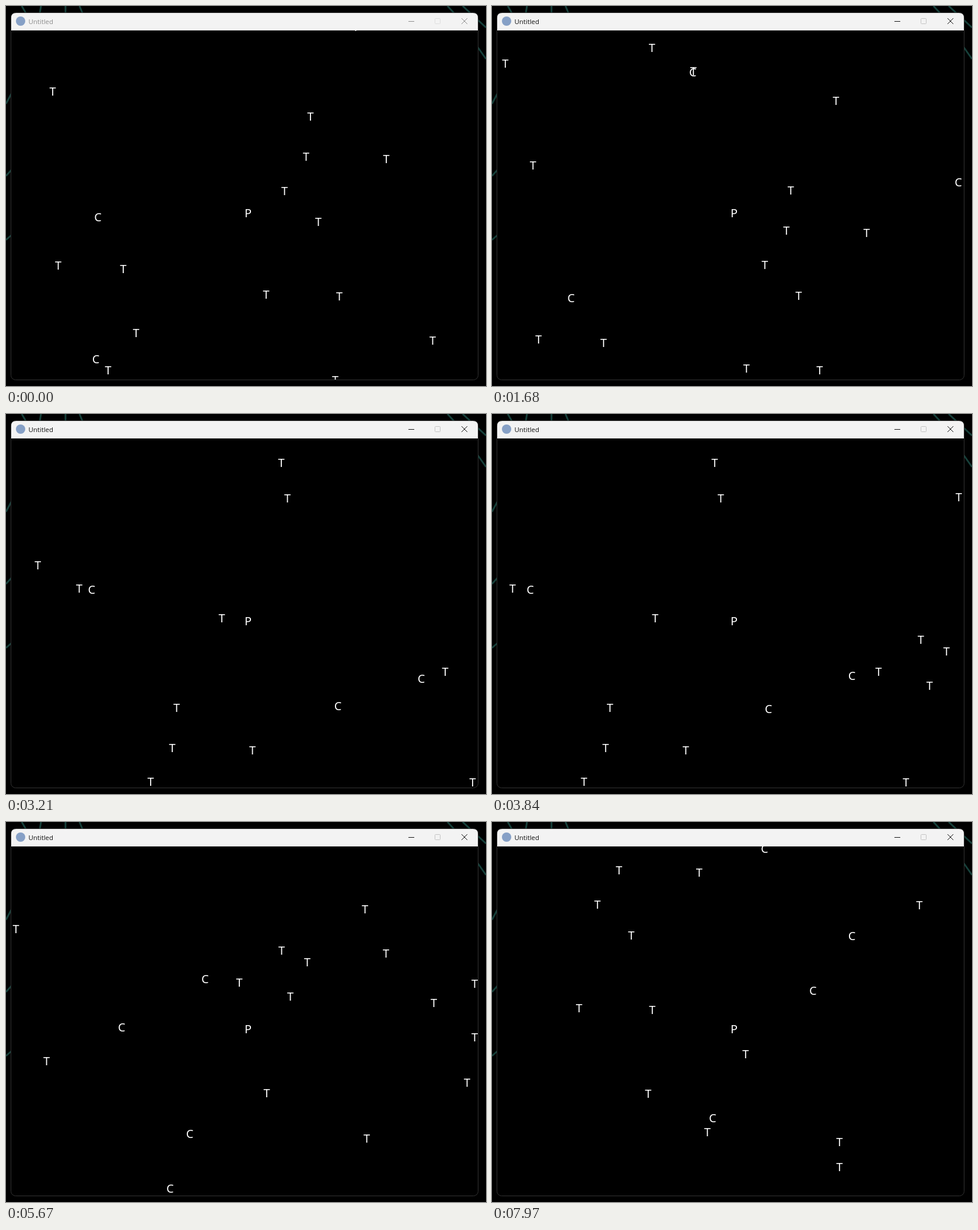
Recreate the animation shown at these times as an HTML page. Size 823 by 653 pixels, loop 8 s.

```html
<!DOCTYPE html>
<html lang="en">
<head>
<meta charset="utf-8">
<title>Untitled</title>
<style>
html, body { margin: 0; width: 100%; height: 100%; overflow: hidden; background: #000; }
svg { display: block; }
.glyphs { font: 20px "Noto Sans", "Open Sans", sans-serif; fill: #fff; text-anchor: middle; }
.title { font: 11.4px "Open Sans", "Noto Sans", sans-serif; }
</style>
</head>
<body>
<svg width="823" height="653" viewBox="0 0 823 653">
  <defs><clipPath id="view"><path d="M9 42H809V634Q809 642 801 642H17Q9 642 9 634Z"/></clipPath></defs>
  <rect width="823" height="653" fill="#000"/>
  <path d="M27 0L34 12M60 0L58 12M102 0V12M126 0L131 12M757 0L768 12M783 0L823 37M809 71L823 91M0 168L9 151M0 292L9 282M0 402L9 394"
    fill="none" stroke="#16403a" stroke-width="3"/>
  <rect x="8.5" y="11.5" width="801" height="631" rx="8" fill="#000" stroke="#333"/>
  <path d="M9 42V20Q9 12 17 12H801Q809 12 809 20V42Z" fill="#f3f3f3"/>
  <circle cx="25" cy="26" r="8" fill="#86a0c6"/>
  <text id="title" class="title" x="38.5" y="31">Untitled</text>
  <path id="buttons" d="M690 26.5H700M781 21L791 31M791 21L781 31" fill="none"/>
  <rect id="maximise" x="735.5" y="21.5" width="9" height="9" rx="1" fill="none"/>
  <g class="glyphs" clip-path="url(#view)">
    <g id="world"></g>
    <text x="415" y="363">P</text>
  </g>
</svg>
<script>
const LOOP = 8000, FOCUS = 420;
const SCROLL = 143.5, DRIFT = 7.2; // px per second on each axis
const $ = id => document.getElementById(id);

// Held keys: the world scrolls at constant speed while one is down
const holds = [
  { axis: "x", dir: -1, from: 1613, to: 5720 },
  { axis: "x", dir: 1, from: 5932, to: LOOP },
  { axis: "y", dir: 1, from: 794, to: 2989 },
  { axis: "y", dir: -1, from: 4506, to: 5720 },
  { axis: "y", dir: -1, from: 5765, to: LOOP }
];

// Landmarks on the map
const trees = [
  [80, 147], [522, 190], [514.5, 259], [652, 263], [477.5, 317.5], [535.5, 371],
  [89.5, 446], [201, 452], [446, 496], [571.5, 499], [223, 562], [175, 626],
  [731.5, 574.5], [564.5, 643], [599.5, 36], [284, -55], [32.5, -28.5], [355, -15],
  [232, -147.5], [712, -170], [701.5, -230.5], [1120, -172], [1055, 73], [1099, 93],
  [982.5, 128], [1070, 152], [1029.5, 318.5], [1198, 2], [1234, 78], [1386, 130],
  [1316, 163], [1386, 222], [1373, 300], [1201, 396], [666, 709], [892.5, 726], [892.5, 769]
];

// Wanderers: place at time 0 and heading
const walkers = [
  [157, 363, -1, 1], [153.5, 607, -1, 1], [329.5, -13, 2, 0], [821, 164, -1, 1],
  [964, 163, -1, -1], [856, 429, 1, -1], [904, 523, -1, -1], [674.5, 685, 0, 0]
];

function addGlyph(char) {
  const el = document.createElementNS("http://www.w3.org/2000/svg", "text");
  el.textContent = char;
  $("world").append(el);
  return el;
}

function place(el, x, y) {
  el.setAttribute("x", x);
  el.setAttribute("y", y + 7);
}

function scroll(axis, t) {
  return holds.filter(h => h.axis === axis).reduce((sum, { dir, from, to }) =>
    sum + dir * SCROLL * Math.max(0, Math.min(t, to) - from) / 1000, 0);
}

trees.forEach(([x, y]) => place(addGlyph("T"), x, y));
const walkerEls = walkers.map(() => addGlyph("C"));

function render(t) {
  const active = t >= FOCUS;
  const ink = active ? "#111" : "#8c8c8c";
  $("title").setAttribute("fill", ink);
  $("buttons").setAttribute("stroke", ink);
  $("maximise").setAttribute("stroke", active ? "#c3c3c3" : "#dedede");
  $("world").setAttribute("transform", `translate(${scroll("x", t)} ${scroll("y", t)})`);
  const drift = DRIFT * t / 1000;
  walkers.forEach(([x, y, dx, dy], i) => place(walkerEls[i], x + 0.5 + dx * drift, y + dy * drift));
}

const begin = performance.now();
function tick() {
  render((performance.now() - begin) % LOOP);
  requestAnimationFrame(tick);
}
tick();
</script>
</body>
</html>
```
